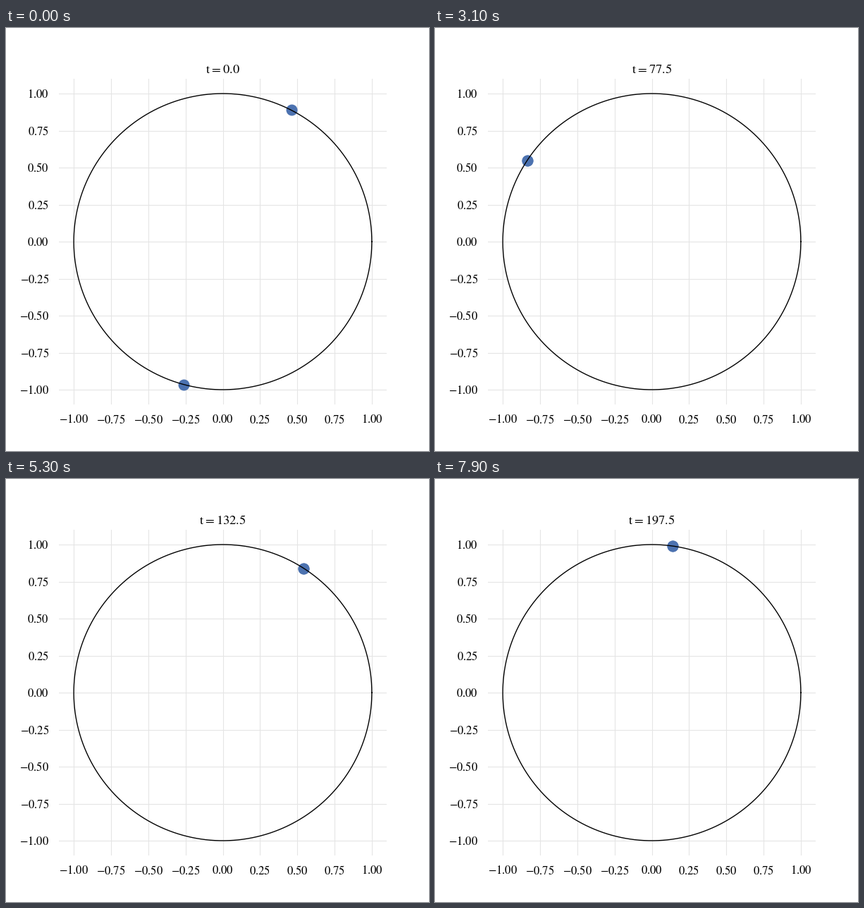
These frames come from a looping animation (600 by 600 pixels, 8000 ms). A matplotlib script:

```python
import numpy as np
import matplotlib.pyplot as plt
from matplotlib.animation import FuncAnimation

plt.rcParams.update({"font.family": "Liberation Serif", "mathtext.fontset": "stix"})

FRAMES, INTERVAL = 80, 100
DT = 2.5            # simulated time per frame
OMEGA = 0.2         # shared natural frequency
COUPLING = 0.302
MEAN0, HALF0 = np.radians([-21.3, 83.95])


def roman(s):
    return rf"$\mathrm{{{s}}}$"


def phases(t):
    """Closed-form solution of two identical coupled phase oscillators."""
    mean = MEAN0 + OMEGA * t
    half = np.arctan(np.tan(HALF0) * np.exp(-COUPLING * t))
    return np.array([mean + half, mean - half])


fig, ax = plt.subplots(figsize=(6, 6), dpi=100)
fig.subplots_adjust(left=0.125, right=0.9, bottom=0.11, top=0.88)
ax.set(xlim=(-1.1, 1.1), ylim=(-1.1, 1.1))

ticks = np.linspace(-1, 1, 9)
labels = [roman(f"{v:.2f}") for v in ticks]
ax.set_xticks(ticks, labels)
ax.set_yticks(ticks, labels)
ax.tick_params(length=0, pad=10, labelsize=12)
ax.set_axisbelow(True)
ax.grid(color="#e5e5e5", linewidth=0.8)
for spine in ax.spines.values():
    spine.set_visible(False)

ring = np.linspace(0, 2 * np.pi, 400)
ax.plot(np.cos(ring), np.sin(ring), color="black", linewidth=1)
dots = ax.scatter([0, 0], [0, 0], s=100, color="#4c72b0", linewidth=1.5)
title = ax.set_title("", fontsize=13.2, pad=6)


def update(i):
    t = i * DT
    theta = phases(t)
    dots.set_offsets(np.column_stack([np.cos(theta), np.sin(theta)]))
    title.set_text(roman(rf"t\hspace{{0.05}}=\hspace{{0.05}}{t:.1f}"))
    return dots, title


anim = FuncAnimation(fig, update, frames=FRAMES, interval=INTERVAL, repeat=True)
plt.show()
```
